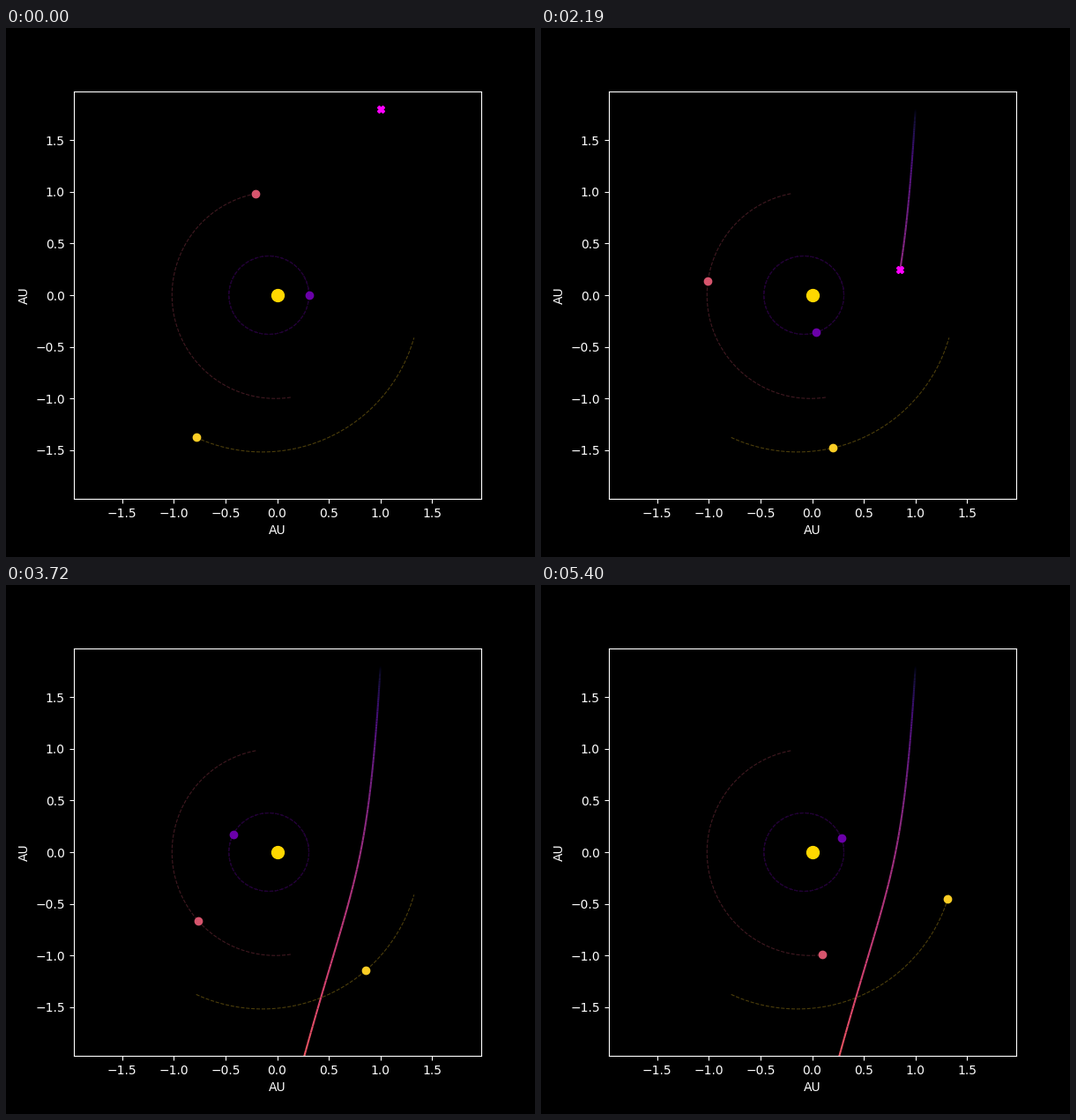
A matplotlib script for the animation above (5.43 s loop, 600x600 px).

```python
import numpy as np
import matplotlib.pyplot as plt
from matplotlib.animation import FuncAnimation
from matplotlib.collections import LineCollection

FRAMES = 181                      # one day per frame
GM = 2.959e-4                     # AU^3 / day^2
THRUST = np.array([0, -4.99e-4])  # AU / day^2
LIMIT = 1.97

# semi-major axis, eccentricity, period in days, mean anomaly at start
PLANETS = [
    (0.3871, 0.2056, 87.97, 0),
    (1.0000, 0.0167, 365.25, 100),
    (1.5237, 0.0934, 686.98, 250),
]


def orbit(day, a, e, period, start):
    """Position on a Kepler orbit with its perihelion on the +x axis."""
    mean = np.radians(start) + 2 * np.pi * np.asarray(day) / period
    ecc = mean + e * np.sin(mean)
    for _ in range(8):
        ecc = ecc - (ecc - e * np.sin(ecc) - mean) / (1 - e * np.cos(ecc))
    return a * (np.cos(ecc) - e), a * np.sqrt(1 - e * e) * np.sin(ecc)


def fly(days):
    """Probe path under solar gravity and constant thrust."""
    pos, vel = np.array([1.0, 1.8]), np.zeros(2)
    path = [pos]
    for _ in range(days):
        vel = vel - GM * pos / np.hypot(*pos) ** 3 + THRUST
        pos = pos + vel
        path.append(pos)
    return np.array(path)


plt.style.use("dark_background")
fig, ax = plt.subplots(figsize=(6, 6), dpi=100)
ax.set_aspect("equal")
ax.set(xlim=(-LIMIT, LIMIT), ylim=(-LIMIT, LIMIT), xlabel="AU", ylabel="AU")

ax.plot(0, 0, "o", color="gold", ms=10)

days = np.linspace(0, 182.6, 600)
dots = []
for planet, shade in zip(PLANETS, np.linspace(0.2, 0.9, len(PLANETS))):
    color = plt.cm.plasma(shade)
    ax.plot(*orbit(days, *planet), "--", color=color, lw=0.8, alpha=0.3)
    dots.append(ax.plot([], [], "o", color=color, zorder=3)[0])

path = fly(FRAMES)
segments = np.stack([path[:-1], path[1:]], axis=1)
shades = plt.cm.magma(np.arange(FRAMES) / FRAMES)
trail = LineCollection([], lw=1.5, zorder=2.5)
ax.add_collection(trail, autolim=False)
probe, = ax.plot([], [], "X", color="magenta", zorder=4)


def update(day):
    for dot, planet in zip(dots, PLANETS):
        x, y = orbit(day, *planet)
        dot.set_data([x], [y])
    probe.set_data(path[day:day + 1, 0], path[day:day + 1, 1])
    trail.set_segments(segments[:day])
    trail.set_color(shades[:day])
    return [*dots, trail, probe]


anim = FuncAnimation(fig, update, frames=FRAMES, interval=30, repeat=True,
                     repeat_delay=0)
plt.show()
```
